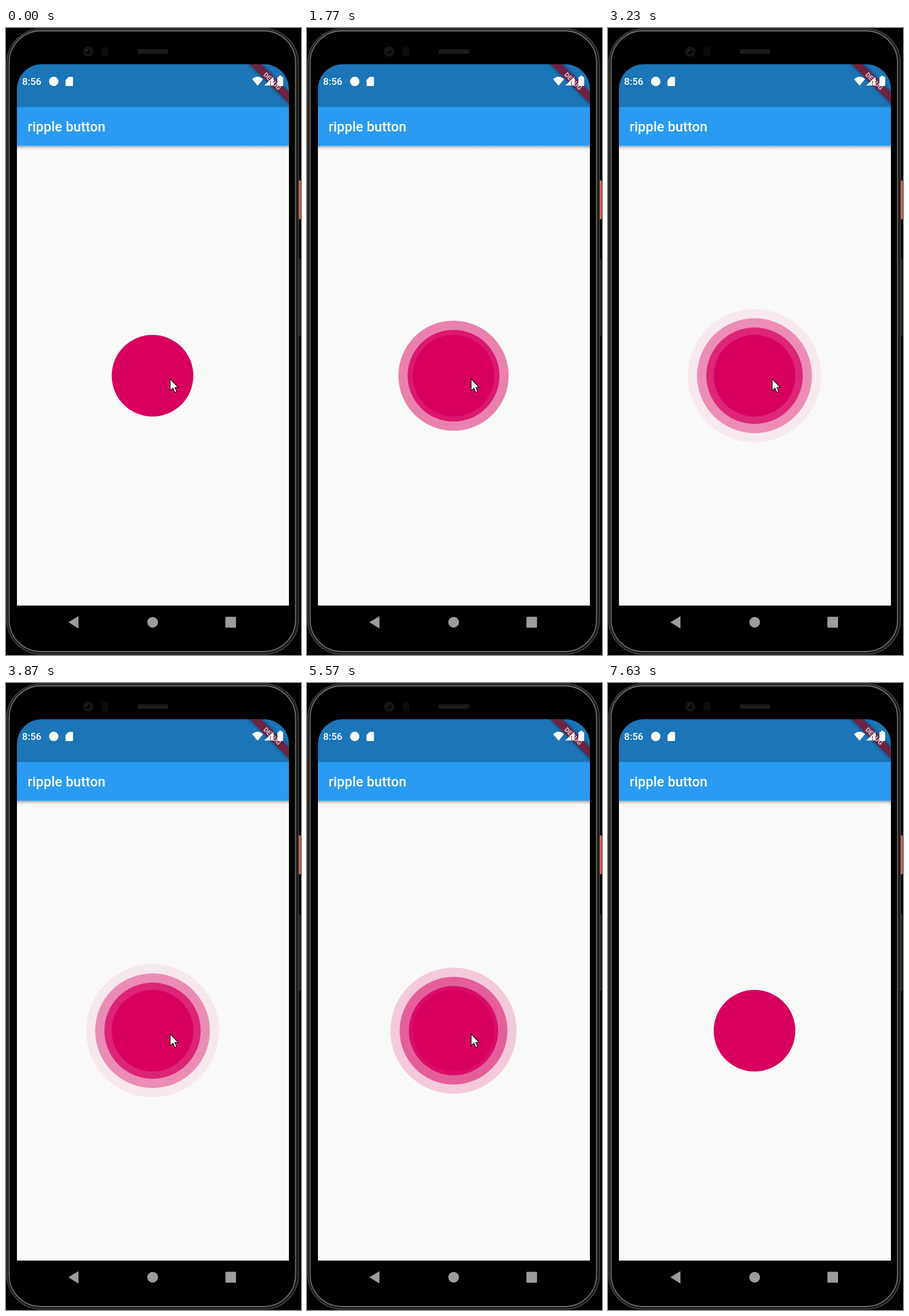
These frames come from a looping animation (513 by 1091 pixels, 7860 ms). An HTML page:

```html
<!DOCTYPE html>
<html lang="en">
<head>
<meta charset="utf-8">
<title>ripple button</title>
<style>
  html, body { margin: 0; width: 100%; height: 100%; overflow: hidden; background: #000; }
  svg { display: block; width: 100%; height: 100%; }
  text { font-family: Roboto, sans-serif; font-weight: 500; fill: #fff; }
</style>
</head>
<body>
<svg viewBox="0 0 513 1091">
  <defs>
    <clipPath id="screen"><rect x="19" y="63" width="473" height="1009" rx="43"/></clipPath>
    <linearGradient id="shade" x2="0" y2="1">
      <stop offset="0" stop-color="#9a9a9c"/>
      <stop offset=".4" stop-color="#dedede"/>
      <stop offset="1" stop-color="#f9f9f8"/>
    </linearGradient>
    <filter id="blur" x="-20%" y="-100%" width="140%" height="300%"><feGaussianBlur stdDeviation="3"/></filter>
  </defs>

  <!-- phone body -->
  <rect width="513" height="1091"/>
  <rect x="506" y="265" width="6.5" height="68" rx="2" fill="#ee6c5a"/>
  <rect x="506" y="402" width="6.5" height="134" rx="2" fill="#232323"/>
  <rect x="1.5" y="1.5" width="507" height="1088" rx="60" fill="#171716" stroke="#3d3d39" stroke-width="2"/>
  <rect x="5.5" y="5" width="498" height="1080" rx="55" stroke="#71716f" stroke-width="1.8"/>
  <rect x="229" y="37" width="53" height="8" rx="3" fill="#1c1c1c"/>
  <circle cx="143" cy="41" r="9" fill="#151515"/>
  <circle cx="143" cy="41" r="4" fill="#070707"/>
  <circle cx="141" cy="39" r="1.3" fill="#3a3a3a"/>
  <rect x="166" y="33" width="12" height="17" rx="5" fill="#0c0c0c"/>

  <!-- app -->
  <g clip-path="url(#screen)">
    <rect x="19" y="63" width="473" height="75" fill="#1b75b7"/>
    <rect x="19" y="137.5" width="473" height="68" fill="#2a9bf0"/>
    <rect x="19" y="205" width="473" height="800" fill="#f9f9f8"/>
    <rect x="19" y="205.5" width="473" height="7" fill="url(#shade)"/>
    <g transform="translate(463 92.3) rotate(45)">
      <rect x="-70" y="-7" width="140" height="14" opacity=".5" filter="url(#blur)"/>
      <rect x="-70" y="-7" width="140" height="14" fill="#6c2243"/>
      <text y="4.2" text-anchor="middle" style="font-size:11.8px;font-weight:900;fill:#cbb5c0">DEBUG</text>
    </g>
  </g>
  <text x="28" y="99" font-size="17">8:56</text>
  <text x="37.5" y="180" font-size="23.5" letter-spacing=".17">ripple button</text>
  <g fill="#fff">
    <circle cx="83" cy="93" r="8.2"/>
    <path d="M109 85h6q1.500 0 1.500 1.500v13q0 1.500-1.500 1.500h-10q-1.500 0-1.500-1.500V90.500z"/>
    <path d="M428 89Q437.500 80.500 447 89L437.500 100.500z"/>
    <path fill-rule="evenodd" d="M449 100L465 85V100zM459 92v4h2v-4zM459 97.500v1.700h2v-1.700z"/>
    <path d="M472 86.500q0-1.500 1.500-1.500h1.500v-2h4v2h1.500q1.500 0 1.500 1.500v13q0 1.500-1.500 1.500h-7q-1.500 0-1.500-1.500z"/>
  </g>
  <g fill="#9c9c9c">
    <path d="M108.500 1034L126 1023.500V1045z"/>
    <circle cx="255" cy="1034" r="9.300"/>
    <rect x="381.500" y="1024.500" width="18.500" height="19" rx="1.500"/>
  </g>

  <g id="rings" fill="#d8005f"></g>
  <circle cx="254.800" cy="605" r="71" fill="#d8005f"/>
  <path id="cursor" d="M0 0V20.500L4.800 16.200 8 23.700 11.300 22.300 8.200 15H14z" fill="#fff" stroke="#000" stroke-width="1.100"/>
</svg>
<script>
const LOOP = 7860, START = 764, STOP = 7200, PERIOD = 648, WAVES = 3;
const ringGroup = document.getElementById('rings');
const cursor = document.getElementById('cursor');

const rings = Array.from({ length: WAVES }, () => {
  const c = document.createElementNS('http://www.w3.org/2000/svg', 'circle');
  c.setAttribute('cx', 254.8);
  c.setAttribute('cy', 605);
  ringGroup.prepend(c);
  return c;
});

const progress = (t, from, to) => Math.min(1, Math.max(0, (t - from) / (to - from)));

function draw(t) {
  const active = t >= START && t < STOP;
  const age = (t - START) / PERIOD;
  rings.forEach((ring, i) => {
    const v = i + age - Math.floor(age);
    const shown = active && v <= age;   // one more wave joins each period
    ring.setAttribute('r', 71 + 16 * v);
    ring.setAttribute('opacity', shown ? 1 - v / WAVES : 0);
  });

  // flick to the corner, pause, then slide off the stage
  const flick = progress(t, STOP - 20, 7270), leave = progress(t, 7480, 7630);
  const x = 285.5 + 216 * flick + 14 * leave;
  const y = 610.5 - 546 * flick + 3 * leave;
  cursor.setAttribute('transform', `translate(${x} ${y})`);
  cursor.setAttribute('visibility', leave < 1 ? 'visible' : 'hidden');
}

function tick(now) {
  draw(now % LOOP);
  requestAnimationFrame(tick);
}
draw(0);
requestAnimationFrame(tick);
</script>
</body>
</html>
```
